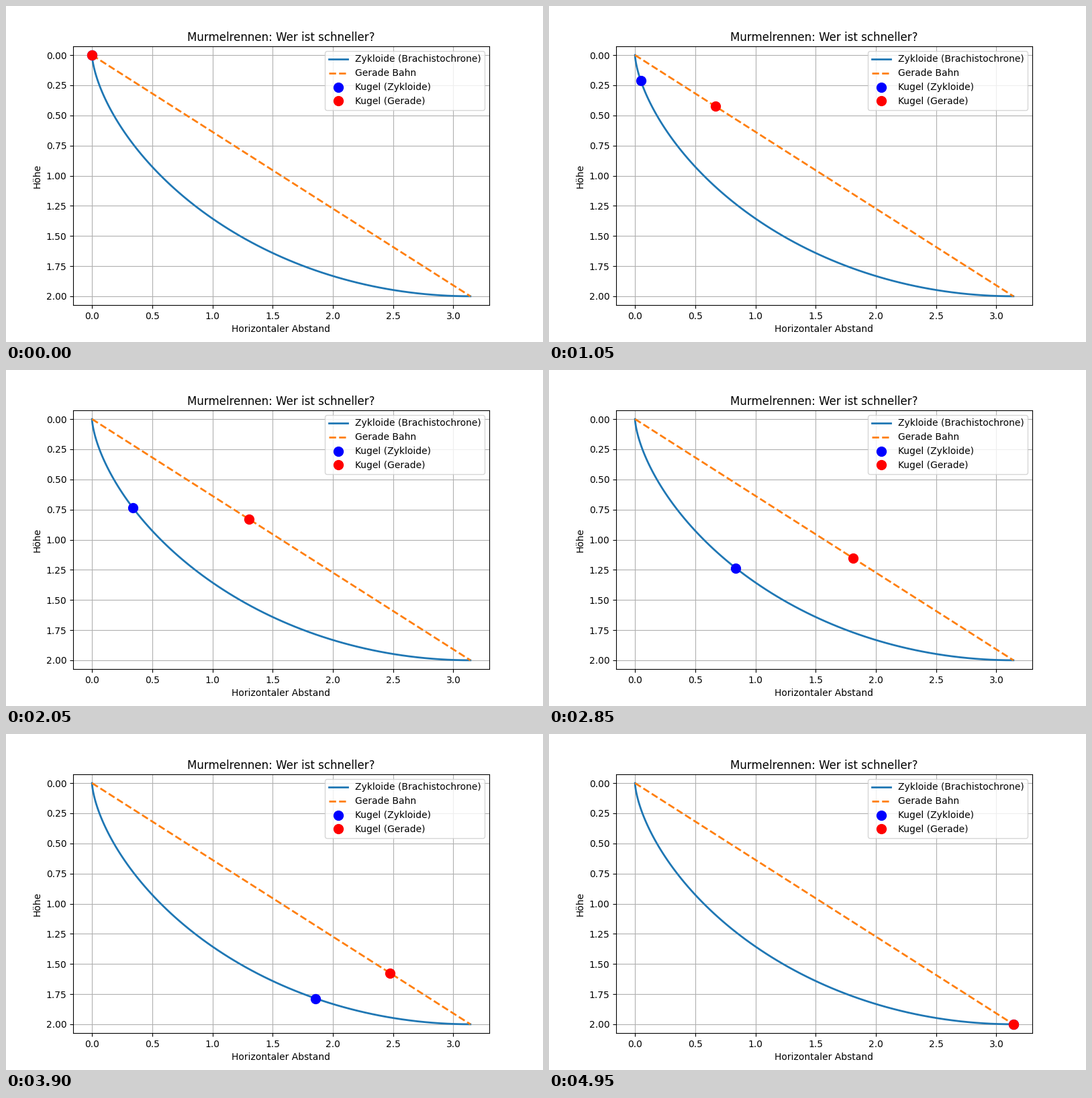
Animation, 800 px wide and 500 px high, one loop 5 s. Source, as a matplotlib script:

```python
import numpy as np
import matplotlib.pyplot as plt
from matplotlib.animation import FuncAnimation

FRAMES = 100
INTERVAL = 50  # ms

theta = np.linspace(0, np.pi, FRAMES)
cycloid = theta - np.sin(theta), 1 - np.cos(theta)
straight = np.linspace(0, np.pi, FRAMES), np.linspace(0, 2, FRAMES)

fig, ax = plt.subplots(figsize=(8, 5), dpi=100)
ax.plot(*cycloid, lw=2, label="Zykloide (Brachistochrone)")
ax.plot(*straight, "--", lw=2, label="Gerade Bahn")
blue_ball, = ax.plot([], [], "bo", markersize=10, label="Kugel (Zykloide)")
red_ball, = ax.plot([], [], "ro", markersize=10, label="Kugel (Gerade)")

ax.set_title("Murmelrennen: Wer ist schneller?")
ax.set_xlabel("Horizontaler Abstand")
ax.set_ylabel("Höhe")
ax.axis("equal")
ax.invert_yaxis()
ax.grid(True)
ax.legend(loc="upper right")


def update(i):
    for ball, (x, y) in ((blue_ball, cycloid), (red_ball, straight)):
        ball.set_data([x[i]], [y[i]])
    return blue_ball, red_ball


anim = FuncAnimation(fig, update, frames=FRAMES, interval=INTERVAL, repeat=True)
plt.show()
```
